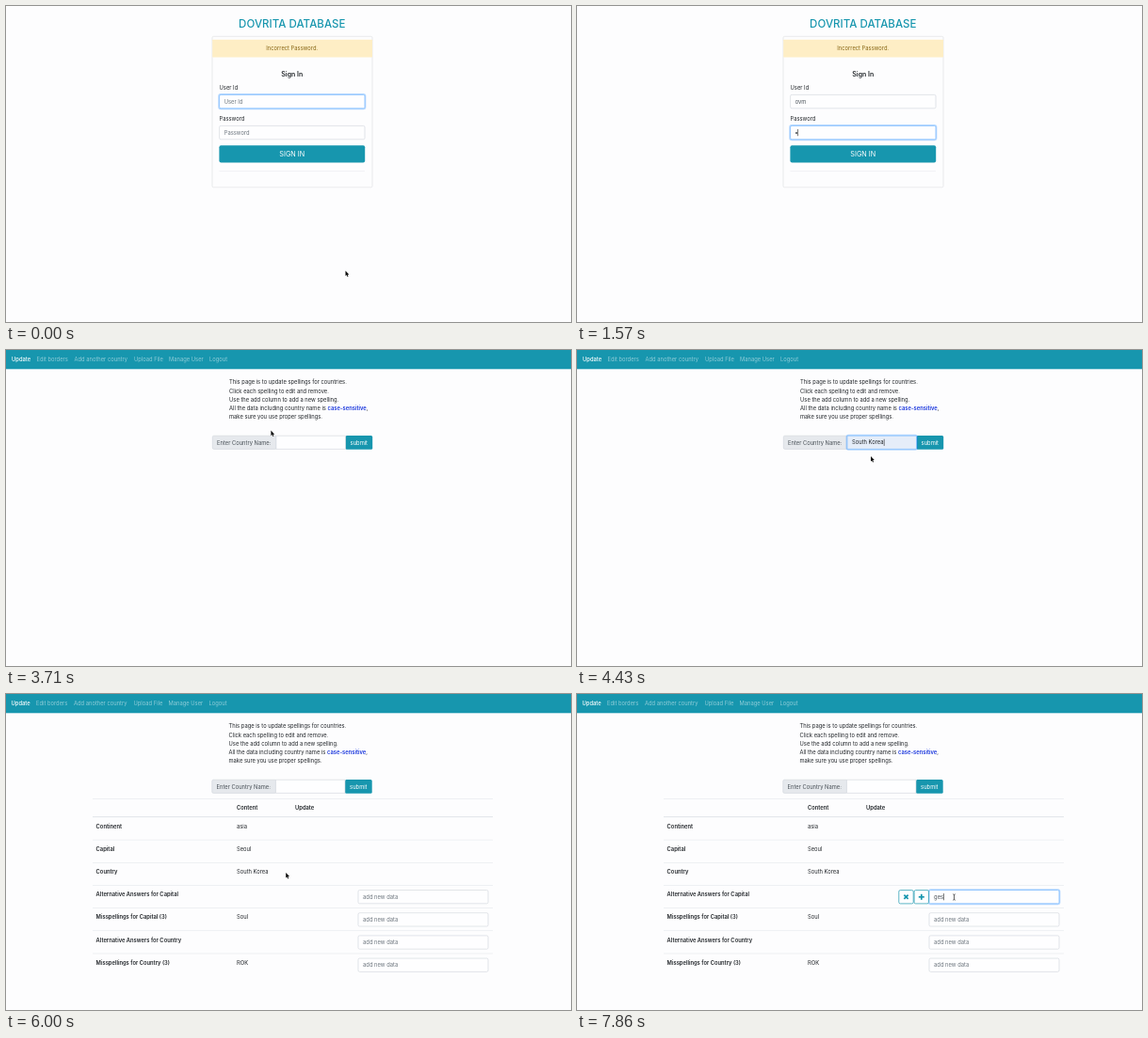
Animation, 600 px wide and 336 px high, one loop 8000 ms. Source, as an HTML page with a canvas:

```html
<!DOCTYPE html>
<html lang="en">
<head>
<meta charset="utf-8">
<title>Country database</title>
<style>
  html, body { margin: 0; width: 100%; height: 100%; overflow: hidden; background: #fdfdfe; }
  canvas { display: block; width: 600px; height: 336px; }
</style>
</head>
<body>
<canvas id="stage" width="600" height="336"></canvas>
<script>
const ctx = document.getElementById('stage').getContext('2d');
const LOOP = 8000;
const SIZE = 5.8;
const TEAL = '#1796ae', INK = '#212529', FIELD_INK = '#495057', HINT = '#6c757d';
const PAGE = '#fdfdfe', BORDER = '#ced4da', RULE = '#dee2e6';

// Fonts are set ten times larger and scaled down to keep fractional advances.
function text(str, x, y, { size = SIZE, weight = 400, color = INK, align = 'left' } = {}) {
  ctx.save();
  ctx.translate(x, y + size * 0.364);
  ctx.scale(0.1, 0.1);
  ctx.font = `${weight} ${size * 10}px Inter, "Liberation Sans", sans-serif`;
  ctx.textAlign = align;
  ctx.fillStyle = color;
  ctx.fillText(str, 0, 0);
  const width = ctx.measureText(str).width / 10;
  ctx.restore();
  return width;
}

function box(x, y, w, h, { fill, stroke, radius = 1.5, line = 0.6 } = {}) {
  ctx.beginPath();
  ctx.roundRect(x, y, w, h, radius);
  if (fill) { ctx.fillStyle = fill; ctx.fill(); }
  if (stroke) { ctx.strokeStyle = stroke; ctx.lineWidth = line; ctx.stroke(); }
}

function rule(x1, x2, y, thickness = 0.5, color = RULE) {
  ctx.fillStyle = color;
  ctx.fillRect(x1, y - thickness / 2, x2 - x1, thickness);
}

function caret(x, y) {
  ctx.fillStyle = '#222';
  ctx.fillRect(x, y - 3.6, 0.6, 7.2);
}

function field(x, y, w, h, { value = '', hint = '', focus = false, fill = '#fefeff', color = FIELD_INK, radius } = {}) {
  if (focus) box(x - 0.6, y - 0.6, w + 1.2, h + 1.2, { stroke: 'rgba(0,123,255,.28)', line: 1.5, radius: 2 });
  box(x, y, w, h, { fill, radius, stroke: focus ? '#80bdff' : BORDER, line: focus ? 0.8 : 0.6 });
  const mid = y + h / 2;
  if (!value) return text(hint, x + 5.1, mid, { color: HINT });
  const width = text(value, x + 5.1, mid, { color });
  if (focus) caret(x + 5.4 + width, mid);
}

function suggestion(x, y, w, label) {
  box(x, y, w, 20, { fill: '#232427', radius: 0.5 });
  text(label, x + 5, y + 10.4, { size: 5, color: '#f2f2f2' });
}

// Picks the value of the last [time, value] step that has begun.
const stepAt = (steps, t) => steps.reduce((now, [at, value]) => (t >= at ? value : now), steps[0][1]);

function pathAt(path, t) {
  const next = path.findIndex(p => p[0] > t);
  if (next === 0) return path[0].slice(1);
  if (next < 0) return path[path.length - 1].slice(1);
  const [t0, x0, y0] = path[next - 1], [t1, x1, y1] = path[next];
  const k = (t - t0) / (t1 - t0), e = k * k * (3 - 2 * k);
  return [x0 + (x1 - x0) * e, y0 + (y1 - y0) * e];
}

function arrow(x, y) {
  const points = [[0, 0], [0, 5.6], [1.2, 4.5], [2.1, 6.5], [3, 6.1], [2.1, 4.2], [3.8, 4.1]];
  ctx.beginPath();
  points.forEach(([dx, dy]) => ctx.lineTo(x + dx, y + dy));
  ctx.closePath();
  ctx.lineJoin = 'round';
  ctx.strokeStyle = '#fff';
  ctx.lineWidth = 0.9;
  ctx.stroke();
  ctx.fillStyle = '#0b0b0b';
  ctx.fill();
}

function iBeam(x, y) {
  ctx.strokeStyle = '#222';
  ctx.lineWidth = 0.7;
  ctx.beginPath();
  ctx.moveTo(x - 1.3, y - 3.2); ctx.lineTo(x, y - 2.6); ctx.lineTo(x + 1.3, y - 3.2);
  ctx.moveTo(x, y - 2.6); ctx.lineTo(x, y + 2.6);
  ctx.moveTo(x - 1.3, y + 3.2); ctx.lineTo(x, y + 2.6); ctx.lineTo(x + 1.3, y + 3.2);
  ctx.stroke();
}

const USER = 'ovm';
const USER_TYPED = [[0, 0], [710, 1], [860, 2], [1000, 3]];
const DOTS = [[0, 0], [1570, 1], [1710, 2], [1860, 4], [2000, 5], [2140, 6],
              [2430, 7], [2570, 8], [2710, 10], [2860, 11]];
const ANSWER = [[0, ''], [7290, 'g'], [7570, 'ge'], [7860, 'ges']];

const LOGIN_POINTER = [[140, 360.5, 281.5], [640, 284.2, 82.5]];
const PAGE_POINTER = [
  [3570, 284, 83], [3710, 281.4, 85.6], [4000, 312, 98], [4290, 312, 113], [4650, 312, 113],
  [4950, 396.3, 101], [5100, 396.3, 101], [5290, 379, 99], [5430, 379, 99],
  [5900, 297.2, 190], [6080, 297.2, 190], [6570, 400.5, 216]
];

const T = {
  passwordFocus: 1290, pageOpen: 3000, pointerBack: 3570, countryFocus: 4000,
  listOpen: 4140, countryFilled: 4430, results: 5430, answerFocus: 6710
};

function drawLogin(t) {
  const onPassword = t >= T.passwordFocus;
  text('DOVRITA DATABASE', 303.8, 18.7, { size: 11.55, weight: 500, color: TEAL, align: 'center' });
  box(219, 32.3, 170, 160.5, { stroke: '#dcdde0', radius: 1.5 });
  box(219.2, 35.8, 169.8, 18.8, { fill: '#feeec5', radius: 0.5 });
  text('Incorrect Password.', 303.7, 45, { color: '#856412', align: 'center' });
  text('Sign In', 303.8, 72.9, { size: 7, weight: 600, align: 'center' });

  text('User Id', 226.5, 86.8);
  text('Password', 226.5, 119.7);
  const typed = USER.slice(0, stepAt(USER_TYPED, t));
  field(226.6, 94.4, 154.4, 14.4, { value: typed, hint: 'User Id', focus: !onPassword });

  const dots = stepAt(DOTS, t);
  field(226.6, 127.4, 154.4, 14.4, { hint: dots ? '' : 'Password', focus: onPassword });
  ctx.fillStyle = '#333a40';
  for (let i = 0; i < dots; i++) {
    ctx.beginPath();
    ctx.arc(233 + i * 2.72, 135, 0.95, 0, Math.PI * 2);
    ctx.fill();
  }
  if (dots) caret(231.7 + dots * 2.72, 134.6);

  box(226.4, 148.3, 154.8, 18.2, { fill: TEAL, radius: 1.9 });
  text('SIGN IN', 303.8, 157.4, { size: 7.25, color: '#fff', align: 'center' });
  rule(226.5, 381, 175.8, 0.5, '#e4e5e8');

  if (typed && !onPassword) suggestion(226.4, 109.3, 154.8, USER);
  if (t < 1140) arrow(...pathAt(LOGIN_POINTER, t));
}

function drawHeader(t) {
  ctx.fillStyle = TEAL;
  ctx.fillRect(-1, 0, 602, 20.3);
  text('Update', 6, 9.8, { weight: 500, color: '#fff' });
  [['Edit borders', 32.5], ['Add another country', 72.5], ['Upload File', 136],
   ['Manage User', 173], ['Logout', 216]].forEach(([label, x]) =>
    text(label, x, 9.8, { color: 'rgba(255,255,255,.52)' }));

  const left = 237, gap = 9.27;
  ['This page is to update spellings for countries.',
   'Click each spelling to edit and remove.',
   'Use the add column to add a new spelling.'].forEach((line, i) => text(line, left, 34.2 + i * gap));
  const y = 34.2 + 3 * gap;
  let x = left + text('All the data including country name is ', left, y);
  x += text('case-sensitive', x, y, { weight: 600, color: '#1633dc' });
  text(',', x, y);
  text('make sure you use proper spellings.', left, 34.2 + 4 * gap);

  const focus = t >= T.countryFocus && t < T.results;
  const filled = t >= T.countryFilled && t < T.results;
  box(219.3, 91.2, 68, 14.2, { fill: '#e6e9ed', stroke: BORDER });
  text('Enter Country Name:', 224, 98.4, { color: FIELD_INK });
  box(360.5, 90.9, 28.7, 14.8, { fill: TEAL });
  text('submit', 374.8, 98.4, { color: '#fff', align: 'center' });
  field(286.9, 91.2, 73.6, 14.2, {
    value: filled ? 'South Korea' : '', focus, radius: 0,
    fill: filled ? '#e5edf9' : '#fefeff', color: INK
  });
  if (t >= T.listOpen && t < T.countryFilled) suggestion(286.9, 106, 73.6, 'South Korea');
}

function iconButton(x, cross) {
  box(x, 208.6, 15.4, 14.3, { fill: '#fefeff', stroke: TEAL, line: 0.7 });
  ctx.save();
  ctx.translate(x + 7.7, 215.8);
  if (cross) ctx.rotate(Math.PI / 4);
  ctx.fillStyle = TEAL;
  ctx.fillRect(-3, -0.85, 6, 1.7);
  ctx.fillRect(-0.85, -3, 1.7, 6);
  ctx.restore();
}

function drawTable(t) {
  const rowHeight = 24.18;
  const bold = { weight: 600 };
  rule(92, 517, 111.5);
  text('Content', 245, 121.2, bold);
  text('Update', 307, 121.2, bold);
  rule(92, 517, 130.7, 0.9);

  const rows = [
    ['Continent', 'asia'], ['Capital', 'Seoul'], ['Country', 'South Korea'],
    ['Alternative Answers for Capital', ''], ['Misspellings for Capital (3)', 'Soul'],
    ['Alternative Answers for Country', ''], ['Misspellings for Country (3)', 'ROK']
  ];
  const editing = t >= T.answerFocus;
  rows.forEach(([label, content], i) => {
    const y = 140.6 + i * rowHeight;
    if (i) rule(92, 517, 130.9 + i * rowHeight);
    text(label, 95.6, y, bold);
    text(content, 245, y);
    if (i < 3) return;
    const focus = i === 3 && editing;
    field(374, y - 4.6, 138, 14.3, {
      value: focus ? stepAt(ANSWER, t) : '', hint: 'add new data', focus
    });
  });
  if (editing) {
    iconButton(341.8, true);
    iconButton(358.1, false);
  }
}

function drawPage(t) {
  const loaded = t >= T.results;
  ctx.save();
  if (loaded) ctx.translate(-0.5, 0);
  drawHeader(t);
  ctx.restore();
  if (loaded) drawTable(t);

  if (t < T.pointerBack) return;
  const [x, y] = pathAt(PAGE_POINTER, t);
  const overAnswer = loaded && x > 374 && y > 208;
  (overAnswer ? iBeam : arrow)(x, y);
}

function render(t) {
  ctx.fillStyle = PAGE;
  ctx.fillRect(0, 0, 600, 336);
  (t < T.pageOpen ? drawLogin : drawPage)(t);
}

const start = performance.now();
function tick() {
  render((performance.now() - start) % LOOP);
  requestAnimationFrame(tick);
}
tick();
</script>
</body>
</html>
```
